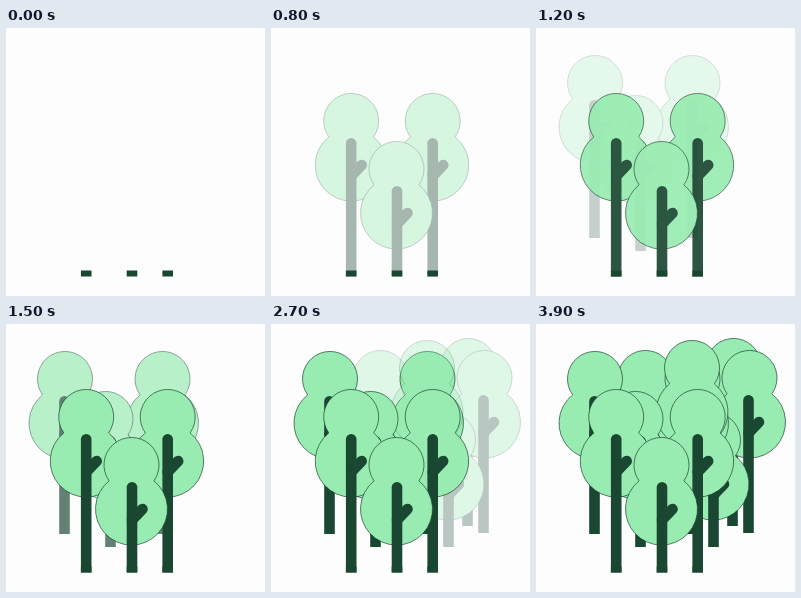
Animation, 259 px wide and 268 px high, one loop 5200 ms. Source, as an HTML page:

```html
<!DOCTYPE html>
<html lang="en">
<head>
<meta charset="utf-8">
<title>Growing grove</title>
<style>
  html, body { margin: 0; width: 100%; height: 100%; overflow: hidden; background: #fefdfe; }
  svg { display: block; }
  .crown { fill: #98ecb1; stroke: #1a4731; stroke-width: .7; stroke-linejoin: round; }
  .trunk { fill: #1a4731; }
  .branch { stroke: #1a4731; stroke-width: 10.6; stroke-linecap: round; }
</style>
</head>
<body>
<svg id="stage" width="259" height="268" viewBox="0 0 259 268"></svg>
<script>
const LOOP = 5200, STEP = 100, FADE = 1000;
const START = { front: 380, middle: 880, back: 2340 };

const crown = (x, y) => `<path class="crown" transform="translate(${x} ${y})"
  d="M-22.4 15.9A27.5 27.5 0 1 1 22.4 15.9A36 36 0 1 1-22.4 15.9Z"/>`;

// x, y: centre of the upper crown circle; foot: bottom of the trunk
const tree = (x, y, foot, trunkX = x) => crown(x, y) +
  `<g transform="translate(${trunkX} ${y})">
    <path class="trunk" d="M-5.3 ${foot - y}V22.3a5.3 5.3 0 0 1 10.6 0V${foot - y}Z"/>
    <path class="branch" d="M0 55L10.5 44"/>
  </g>`;

const row = (name, ...parts) => `<g data-row="${name}">${parts.join('')}</g>`;
const stump = x => `<rect class="trunk" x="${x - 5.3}" y="242.5" width="10.6" height="6"/>`;

stage.innerHTML =
  row('back',
    tree(197.5, 42, 202, 196.5),
    tree(213.5, 54, 209, 212.5),
    tree(177, 116, 223, 177.5),
    tree(109.5, 54, 192)) +
  row('middle',
    tree(156.5, 55, 210),
    row('back', crown(156, 44)),
    tree(99.5, 95, 223, 104.5),
    tree(59, 55, 210, 58.5)) +
  row('front',
    tree(80.2, 93, 248.5),
    tree(161.7, 93, 248.5),
    tree(125.5, 141, 248.5, 126)) +
  [80.2, 126, 161.7].map(stump).join('');

const rows = document.querySelectorAll('[data-row]');

function ease(p) {
  p = Math.min(1, Math.max(0, p));
  return p * p * (3 - 2 * p);
}

function draw() {
  const t = Math.floor(performance.now() % LOOP / STEP) * STEP;
  for (const g of rows) g.setAttribute('opacity', ease((t - START[g.dataset.row]) / FADE));
  requestAnimationFrame(draw);
}
draw();
</script>
</body>
</html>
```
